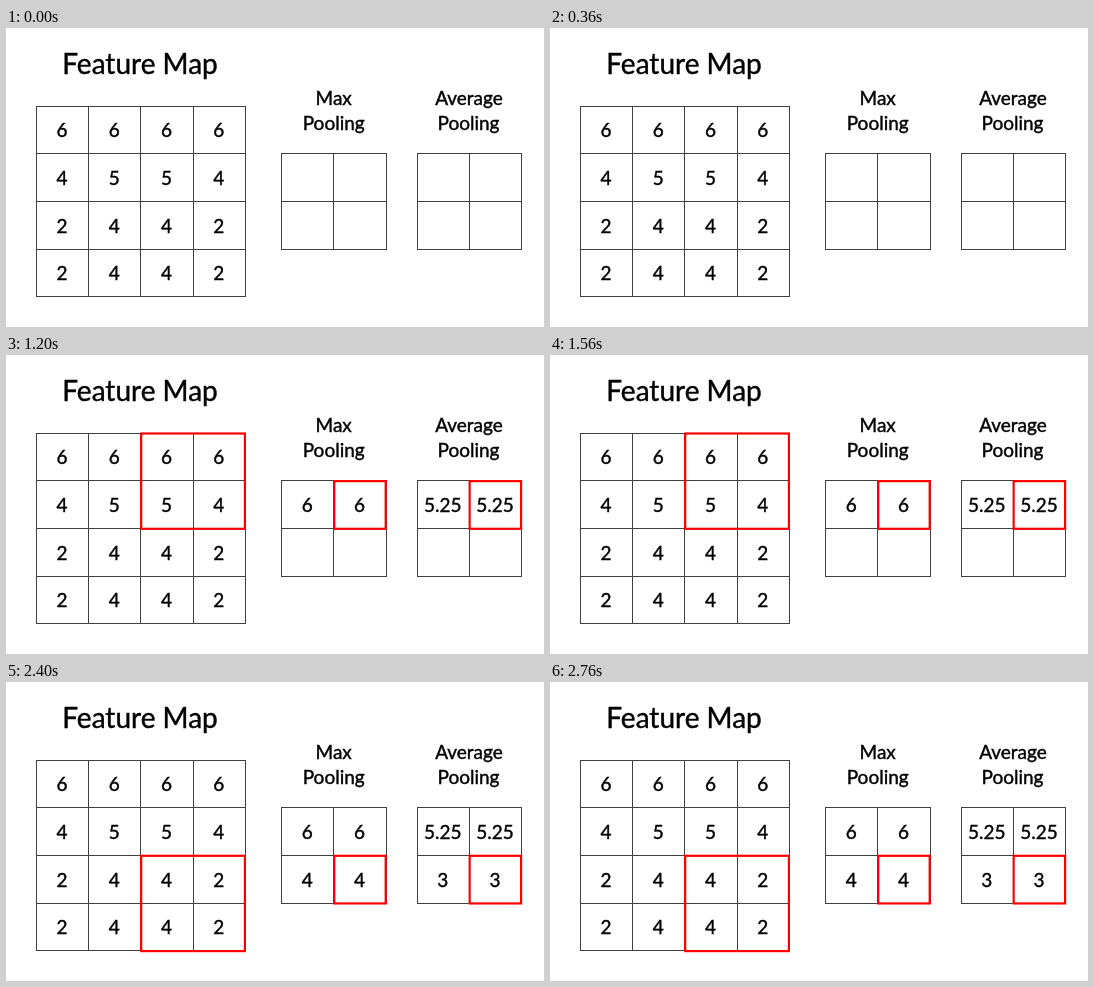
Recreate the animation shown at these times as an HTML page with a canvas. Size 538 by 299 pixels, loop 3000 ms.

```html
<!DOCTYPE html>
<html lang="en">
<head>
<meta charset="utf-8">
<title>Max and average pooling</title>
<style>
html, body { margin: 0; width: 100%; height: 100%; overflow: hidden; background: #fff; }
canvas { display: block; }
</style>
</head>
<body>
<canvas id="stage" width="538" height="299"></canvas>
<script>
const ctx = document.getElementById('stage').getContext('2d');
const CELL_W = 52.25, CELL_H = 47.65, STEP = 600, STEPS = 5;
const map = [[6, 6, 6, 6], [4, 5, 5, 4], [2, 4, 4, 2], [2, 4, 4, 2]];
const feature = { x: 30.3, y: 78.1, size: 4 };
const outputs = [
  { x: 275.6, y: 125.75, size: 2, pool: v => Math.max(...v) },
  { x: 411, y: 125.75, size: 2, pool: v => v.reduce((a, b) => a + b) / v.length }
];

// A hairline outline gives the regular weight a slightly heavier look.
function text(value, x, y, size = 19) {
  ctx.font = `${size}px Lato, sans-serif`;
  ctx.strokeStyle = '#000';
  ctx.lineWidth = 0.4;
  ctx.fillText(value, x, y);
  ctx.strokeText(value, x, y);
}

function grid({ x, y, size }) {
  const px = i => Math.floor(x + i * CELL_W) + 0.5;
  const py = i => Math.floor(y + i * CELL_H) + 0.5;
  ctx.strokeStyle = '#404040';
  ctx.lineWidth = 1;
  ctx.beginPath();
  for (let i = 0; i <= size; i++) {
    ctx.moveTo(px(i), py(0) - 0.5);
    ctx.lineTo(px(i), py(size) + 0.5);
    ctx.moveTo(px(0) - 0.5, py(i));
    ctx.lineTo(px(size) + 0.5, py(i));
  }
  ctx.stroke();
}

function cellText(g, col, row, value) {
  text(value, g.x + (col + 0.5) * CELL_W - 0.4, g.y + (row + 0.5) * CELL_H + 7.4);
}

function highlight(g, col, row, span) {
  ctx.strokeStyle = '#f00';
  ctx.lineWidth = 2.2;
  ctx.strokeRect(g.x + col * CELL_W + 0.4, g.y + row * CELL_H + 0.4, span * CELL_W - 0.8, span * CELL_H);
}

function draw(step) {
  ctx.fillStyle = '#fff';
  ctx.fillRect(0, 0, 538, 299);
  ctx.fillStyle = '#000';
  ctx.textAlign = 'center';
  ctx.lineJoin = 'miter';
  text('Feature Map', 134, 45.7, 28);
  text('Max', 327.7, 77);
  text('Pooling', 327.7, 102);
  text('Average', 463, 77);
  text('Pooling', 462.5, 102);

  [feature, ...outputs].forEach(grid);
  map.forEach((line, row) => line.forEach((v, col) => cellText(feature, col, row, v)));

  for (let i = 0; i < step; i++) {
    const col = i % 2, row = i >> 1;
    const block = map.slice(row * 2, row * 2 + 2).flatMap(r => r.slice(col * 2, col * 2 + 2));
    for (const out of outputs) cellText(out, col, row, out.pool(block));
    if (i === step - 1) {
      highlight(feature, col * 2, row * 2, 2);
      for (const out of outputs) highlight(out, col, row, 1);
    }
  }
}

function tick() {
  draw(Math.floor(performance.now() / STEP) % STEPS);
  requestAnimationFrame(tick);
}
tick();
</script>
</body>
</html>
```
